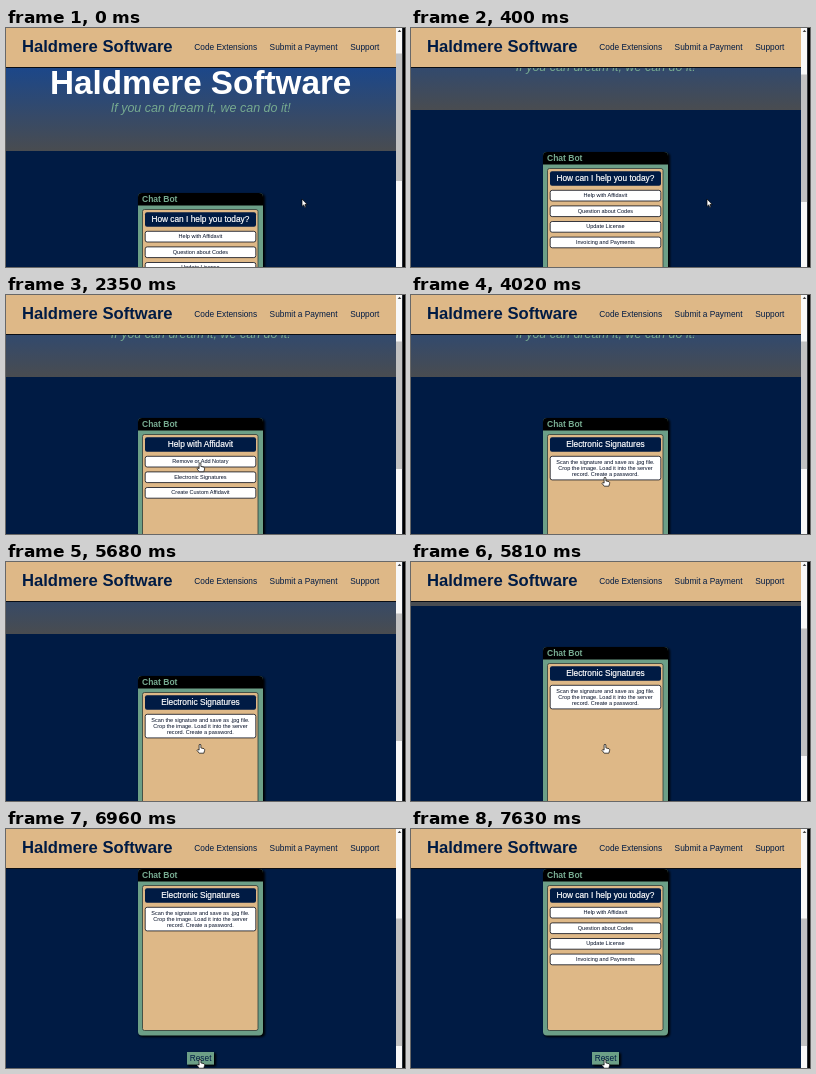
These frames come from a looping animation (399 px wide and 239 px high, 8 s). An HTML page:

```html
<!DOCTYPE html>
<html lang="en">
<head>
<meta charset="utf-8">
<title>Haldmere Software</title>
<style>
  html, body { margin: 0; width: 100%; height: 100%; overflow: hidden; background: #001b44; }
  svg { display: block; width: 399px; height: 239px; font-family: "Liberation Sans", Arial, sans-serif; font-size: 8.32px; }
  .navy { fill: #001b44; }
  .green { fill: #6c9f87; }
  .tan { fill: #deb887; }
  .mid { text-anchor: middle; }
  .bold { font-weight: bold; }
  .soft { fill: #76aa90; }
  .head { fill: #fff; stroke: #fff; stroke-width: .2; }
  .small { font-size: 5.55px; fill: #000c24; }
  .card { fill: #fff; stroke: #0a0f1c; stroke-width: .8; }
  .pointer { fill: #fff; stroke: #000; stroke-width: .7; stroke-linejoin: round; }
</style>
</head>
<body>
<svg viewBox="0 0 399 239" xmlns="http://www.w3.org/2000/svg">
  <defs>
    <linearGradient id="sky" x1="0" y1="0" x2="0" y2="1">
      <stop offset="0" stop-color="#1c4789"/>
      <stop offset="1" stop-color="#494c50"/>
    </linearGradient>
    <filter id="shade" x="-10%" y="-10%" width="120%" height="120%">
      <feGaussianBlur stdDeviation="1.3"/>
    </filter>
  </defs>
  <rect class="navy" width="399" height="239"/>

  <g id="hero">
    <rect y="40" width="390" height="83" fill="url(#sky)"/>
    <text class="mid bold" x="194.7" y="65.7" font-size="33.28" fill="#fff">Haldmere Software</text>
    <text class="mid soft" x="194.7" y="84.3" font-size="12.5" font-style="italic">If you can dream it, we can do it!</text>
  </g>

  <g id="chat">
    <rect x="133" y="166" width="126" height="167" rx="4" filter="url(#shade)"/>
    <rect class="green" x="132" y="165" width="125" height="166.5" rx="4"/>
    <path d="M132 177.5V169q0-4 4-4h117q4 0 4 4v8.5z"/>
    <text class="soft bold" x="136" y="174.2" font-size="8.5">Chat Bot</text>
    <rect class="tan" x="136.5" y="181.5" width="115.5" height="145" rx="2" stroke="#2c3a38" stroke-width=".8"/>
    <g id="panels"></g>

    <rect x="182" y="349.2" width="28" height="13.2" filter="url(#shade)"/>
    <rect class="green" x="181" y="348" width="27" height="12.6"/>
    <text class="mid navy" x="194.6" y="357.4">Reset</text>
  </g>

  <rect class="tan" width="390" height="39"/>
  <rect y="39" width="390" height="1" fill="#0a0d14"/>
  <text class="navy bold" x="16" y="24.4" font-size="16.64">Haldmere Software</text>
  <g class="navy">
    <text x="188.3" y="21.8">Code Extensions</text>
    <text x="263.6" y="21.8">Submit a Payment</text>
    <text x="344.3" y="21.8">Support</text>
  </g>

  <rect x="390" width="6.4" height="239" fill="#f8f8f8"/>
  <path d="M391.7 4l1.8-2.2 1.8 2.2z" fill="#444"/>
  <rect id="thumb" x="390" y="25.5" width="6.4" height="127.5" fill="#c1c1c1"/>
  <rect x="396.4" width="2.6" height="239"/>

  <path id="arrow" class="pointer" d="M0 0V7.4L1.7 5.9 2.8 8.4 3.9 7.9 2.9 5.5H5.2z"/>
  <path id="hand" class="pointer" d="M-.9.8Q0-.4.9.8V3.9L4 4.7Q4.9 5.1 4.6 6.5L3.8 9.2H-.8L-3 6.3Q-2.6 4.9-.9 6.1z"/>
</svg>
<script>
const LOOP = 8000;
const $ = id => document.getElementById(id);

// [time, scroll offset]
const scrolls = [
  [0, 0], [70, 8], [140, 19], [200, 29], [270, 37], [340, 41], [540, 41.6],
  [5680, 51], [5740, 67], [5810, 79.5], [5880, 83.2],
  [6210, 92], [6280, 106], [6350, 117], [6410, 124.8]
];

// [time, shape, x, y]
const moves = [
  [0, "arrow", 296, 171], [800, "arrow", 300, 172], [870, "arrow", 302, 174],
  [940, "arrow", 295, 174], [1010, "arrow", 276, 173], [1080, "arrow", 253, 172],
  [1150, "hand", 232, 171], [1230, "hand", 216, 170], [1300, "hand", 207, 170],
  [1370, "hand", 202, 170], [1430, "hand", 199, 169], [1500, "hand", 197, 169],
  [1560, "hand", 196, 168], [1630, "hand", 195, 168], [1690, "hand", 194, 167.5],
  [3300, "hand", 194, 169], [3370, "hand", 194, 171], [3430, "hand", 194, 174],
  [3500, "hand", 194, 177], [3570, "hand", 194, 179], [3640, "hand", 194, 181],
  [3750, "hand", 194, 182], [6210, "arrow", 194, 182],
  [6480, "arrow", 194, 186], [6550, "arrow", 194, 194], [6620, "arrow", 194, 205],
  [6680, "arrow", 194, 215], [6750, "hand", 194, 223], [6820, "hand", 194, 227],
  [6890, "hand", 194, 229], [6960, "hand", 194, 230]
];

// [time, panel index]
const views = [[0, 0], [2220, 1], [3890, 2], [7570, 0]];

const text = (y, s, cls) => `<text x="194.4" y="${y}" class="mid ${cls}">${s}</text>`;
const card = (y, h) => `<rect class="card" x="139.2" y="${y}" width="110.6" height="${h}" rx="2"/>`;

const panel = (title, body) => `<g>
  <rect class="navy" x="139" y="184.2" width="111" height="14.6" rx="2"/>
  ${text(194.2, title, "head")}${body}</g>`;

const menu = items => items.map((s, i) => {
  const y = 203.3 + 15.6 * i;
  return card(y, 10.7) + text(y + 6.9, s, "small");
}).join("");

const answer = lines => card(203.3, 23.6) +
  lines.map((s, i) => text(210.5 + 6.4 * i, s, "small")).join("");

$("panels").innerHTML =
  panel("How can I help you today?", menu([
    "Help with Affidavit", "Question about Codes", "Update License", "Invoicing and Payments"])) +
  panel("Help with Affidavit", menu([
    "Remove or Add Notary", "Electronic Signatures", "Create Custom Affidavit"])) +
  panel("Electronic Signatures", answer([
    "Scan the signature and save as .jpg file.",
    "Crop the image. Load it into the server",
    "record. Create a password."]));

const panels = [...$("panels").children];
const at = (steps, t) => steps.findLast(step => step[0] <= t);
const show = (el, on) => el.setAttribute("visibility", on ? "visible" : "hidden");
const place = (el, x, y) => el.setAttribute("transform", `translate(${x} ${y})`);

function draw(t) {
  // Each block snaps to whole pixels, as in page layout.
  const [, scroll] = at(scrolls, t);
  place($("hero"), 0, Math.round(0.4 - scroll));
  place($("chat"), 0, Math.round(-0.1 - scroll));
  place($("thumb"), 0, Math.round(scroll * 0.512));

  const [, view] = at(views, t);
  panels.forEach((p, i) => show(p, i === view));

  const [, shape, x, y] = at(moves, t);
  for (const id of ["arrow", "hand"]) {
    show($(id), id === shape);
    place($(id), x, y);
  }
}

const start = performance.now();
function tick() {
  draw((performance.now() - start) % LOOP);
  requestAnimationFrame(tick);
}
tick();
</script>
</body>
</html>
```
